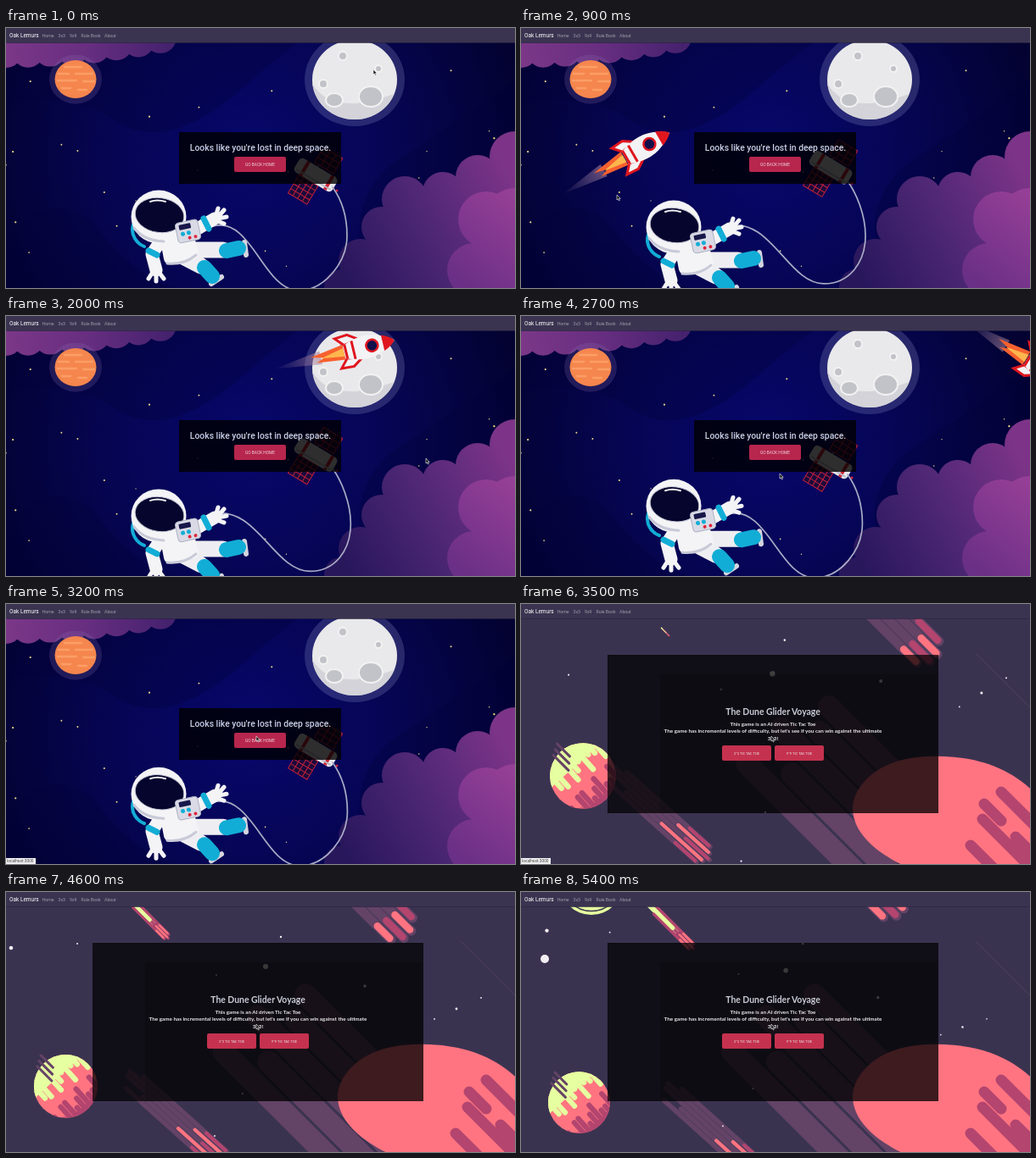
Animation, 600 px wide and 307 px high, one loop 5500 ms. Source, as an HTML page:

```html
<!DOCTYPE html>
<html lang="en">
<head>
<meta charset="utf-8">
<title>Lost in space</title>
<style>
html, body { margin: 0; height: 100%; overflow: hidden; background: #3a3350 }
svg { display: block; width: 100%; height: 100% }
text { font-family: Roboto, sans-serif; fill: #fff }
.mid { text-anchor: middle }
.nav { font-size: 5.2px; fill: #a09cac }
.game text { font-family: Lato, sans-serif; fill: #e8e8ea }
.round { stroke-linecap: round; stroke-linejoin: round; fill: none }
.wing { fill: #1a0a3c; stroke: #c42038 }
</style>
</head>
<body>
<svg viewBox="0 0 600 307" preserveAspectRatio="none">
<defs>
  <radialGradient id="sky" gradientUnits="userSpaceOnUse" cx="290" cy="150" r="330">
    <stop stop-color="#07076c"/><stop offset=".5" stop-color="#060553"/><stop offset="1" stop-color="#030230"/>
  </radialGradient>
  <linearGradient id="cloudOut" gradientUnits="userSpaceOnUse" x1="400" y1="290" x2="600" y2="180">
    <stop stop-color="#29175c"/><stop offset=".5" stop-color="#4e2775"/><stop offset="1" stop-color="#7d3488"/>
  </linearGradient>
  <linearGradient id="cloudIn" gradientUnits="userSpaceOnUse" x1="520" y1="290" x2="600" y2="190">
    <stop stop-color="#6a2f86"/><stop offset="1" stop-color="#984097"/>
  </linearGradient>
  <linearGradient id="cloudTop" gradientUnits="userSpaceOnUse" x1="0" y1="30" x2="190" y2="20">
    <stop stop-color="#7b3788"/><stop offset=".5" stop-color="#672e80"/><stop offset="1" stop-color="#46226e"/>
  </linearGradient>
  <linearGradient id="trail">
    <stop stop-color="#8f7fa8" stop-opacity="0"/><stop offset="1" stop-color="#a98098" stop-opacity=".6"/>
  </linearGradient>
  <clipPath id="disc"><circle r="37"/></clipPath>
  <clipPath id="moonClip"><ellipse cx="411" cy="61" rx="50" ry="47"/></clipPath>
</defs>

<g id="lost">
  <rect width="600" height="307" fill="url(#sky)"/>
  <g fill="#02023a" opacity=".3">
    <path d="M0 90Q70 70 130 110T280 70T360 17H0Z"/>
    <path d="M0 250Q60 180 110 240T200 307H0Z"/>
    <path d="M430 307Q390 200 470 150T600 60V307Z"/>
  </g>
  <g id="sparks" fill="#f5dc8a"></g>
  <g id="cloudLeft" fill="url(#cloudTop)"></g>
  <ellipse cx="82" cy="60.500" rx="31" ry="29" fill="#8a70b0" opacity=".22"/>
  <ellipse cx="82" cy="60.500" rx="24.500" ry="22.500" fill="#f5864d"/>
  <path class="round" stroke="#ffb077" stroke-width="2.500" opacity=".6" d="M69 46h20M62 54h12m8 0h20M61 62h22m8 1h13M66 71h10m9 2h10"/>
  <ellipse cx="411" cy="61" rx="59" ry="55" fill="#8a90c8" opacity=".25"/>
  <g clip-path="url(#moonClip)">
    <path d="M350 0H470V120H350Z" fill="#e9e9eb"/>
    <path d="M359 61Q380 108 462 76V120H359Z" fill="#d3d3d9"/>
    <g fill="#c2c2c9" stroke="#f2f2f2" stroke-width="2">
      <ellipse cx="430" cy="81" rx="14" ry="12"/><ellipse cx="387" cy="85" rx="10" ry="8"/>
      <circle cx="374" cy="66" r="5"/><circle cx="439" cy="48" r="4"/><circle cx="397" cy="33" r="5"/>
    </g>
  </g>
  <g id="cloudRight"></g>

  <g id="rocket">
    <path d="M-106 0L-50 -8V8Z" fill="url(#trail)"/>
    <path d="M-62 -3L-22 -9V9L-56 5L-46 1Z" fill="#f7602f"/>
    <path d="M-50 1L-22 -5V5Z" fill="#ffb64d"/>
    <path d="M-2 -11L-14 -19L-29 -18L-20 -8ZM-2 11L-14 19L-29 18L-20 8Z" fill="#f3f3f5" stroke="#e0161f" stroke-width="3"/>
    <path d="M-21 -8Q8 -20 30 -6Q38 -2 39 0Q38 2 30 6Q8 20 -21 8Z" fill="#f3f3f5"/>
    <path d="M25 -9.500Q36 -5 39 0Q36 5 25 9.500Z" fill="#e0161f"/>
    <path d="M-21 -8L-18 -9V9L-21 8ZM-12 -11h3v22h-3Z" fill="#e0161f"/>
    <circle cx="12" r="7" fill="#10104a" stroke="#e0161f" stroke-width="2.500"/>
  </g>

  <g id="satellite" transform="translate(366 174)">
    <g transform="rotate(31)">
      <path d="M-4 -9V-34M-4 9V29" stroke="#c9a0b0"/>
      <path class="wing" d="M-10 -33h26v21h-26zM-1 -33v21m8 -21v21M-10 -26h26m-26 7h26"/>
      <path class="wing" d="M-18 10h26v25h-26zM-11.500 10v25m6.500 -25v25m6.500 -25v25M-18 16h26m-26 6.500h26m-26 6.500h26"/>
      <rect x="-27" y="-9.500" width="52" height="19" rx="5" fill="#e9e9ed"/>
      <path d="M-18 -9.500h4v19h-4zM15 -9.500h4v19h-4z" fill="#cf2233"/>
      <path d="M-24 6H23" stroke="#babac6" stroke-width="2"/>
    </g>
    <circle cx="24" cy="18" r="1.500" fill="#e0243c"/>
  </g>

  <path id="rope" class="round" stroke="#a9abc6" stroke-width="1.700"/>
  <g id="astronaut" class="round">
    <path d="M205 262L256 262M205 268L230 281" stroke="#eeeef2" stroke-width="19"/>
    <path d="M281 253L283 268M242 302L254 294" stroke="#d4d5de" stroke-width="6"/>
    <path d="M260 263L274 260M234 283L243 293" stroke="#12add6" stroke-width="18"/>
    <path d="M183 250L172 267L177 286M214 244L246 225" stroke="#f4f4f6" stroke-width="15"/>
    <path d="M247 223L250 213M250 223L257 215M250 225L260 223M249 228L257 231M173 288L168 296M177 290L177 299M180 288L186 296" stroke="#f4f4f6" stroke-width="5"/>
    <path d="M168 263L178 268M233 225L239 237" stroke="#12add6" stroke-width="7"/>
    <path d="M188 246L214 244L220 266L193 272Z" fill="#f4f4f6" stroke="#f4f4f6" stroke-width="14"/>
    <path d="M190 278Q210 280 224 268" stroke="#c9cad8" stroke-width="3"/>
    <path d="M150 232C146 245 155 255 163 258" stroke="#12add6" stroke-width="4"/>
    <ellipse cx="180" cy="223" rx="32.500" ry="31.500" fill="#f4f4f6"/>
    <path d="M151 236Q162 251 186 252" stroke="#c9cad8" stroke-width="3"/>
    <ellipse cx="181" cy="221" rx="29" ry="20.500" transform="rotate(8 181 221)" fill="#05052e" stroke="#c9cad8"/>
    <path d="M170 205Q178 202 188 205" stroke="#f4f4f6" stroke-width="2"/>
    <g transform="rotate(-12 214 240)">
      <rect x="201" y="228" width="27" height="24" rx="4" fill="#d9dae5" stroke="#aeb0c4"/>
      <rect x="205" y="231" width="14" height="6" rx="1" fill="#17174a"/>
      <path d="M208 242h0M215 242h0" stroke="#12add6" stroke-width="5"/>
      <path d="M215 248h0M222 248h0" stroke="#e0243c" stroke-width="4"/>
    </g>
  </g>

  <rect x="204" y="123" width="191" height="61" fill="#000" opacity=".8"/>
  <text class="mid" x="300" y="145" font-size="10.350" font-weight="500" style="fill:#c9cfe6">Looks like you're lost in deep space.</text>
  <rect x="269" y="152" width="61" height="18" rx="2" fill="#b7264d"/>
  <text class="mid" x="299.500" y="162.700" font-size="4.800" style="fill:#efd5de">GO BACK HOME</text>
</g>

<g id="home" class="game">
  <rect width="600" height="307" fill="#3a3350"/>
  <path d="M536 58L600 122" stroke="#5a4762" stroke-width=".7"/>
  <g id="giantTrail" class="round"></g>
  <g id="lowMeteor" class="round"></g>
  <g id="highMeteor" class="round"></g>
  <g id="nearMeteor" class="round"></g>
  <g id="stars" fill="#f3eef2"></g>
  <circle id="nearStar" r="5" fill="#f3eef2"/>
  <g id="newPlanet"><circle r="37" fill="#e6ffa0"/><path d="M-25 22A35 35 0 0 0 25 22" fill="none" stroke="#3a3350" stroke-width="1.500"/></g>
  <g id="planet" class="round"></g>
  <path d="M391 238C396 205 432 181 480 180C535 178 580 193 612 230V320H478C430 303 389 275 391 238Z" fill="#ff7480"/>
  <path class="round" stroke="#b3456f" stroke-width="13" d="M566 222L615 271M546 236L566 256M544 254L610 320M530 285L570 325M583 275L610 302"/>
  <rect x="102" y="60" width="390" height="187" fill="#000" opacity=".73"/>
  <rect x="164" y="83" width="328" height="164" fill="#000" opacity=".12"/>
  <text class="mid" x="297" y="131" font-size="10.400" font-weight="700" style="fill:#c9ccd6">The Dune Glider Voyage</text>
  <g class="mid" font-size="6.300" font-weight="700">
    <text x="297" y="143.500">This game is an AI driven Tic Tac Toe</text>
    <text x="297" y="152">The game has incremental levels of difficulty, but let's see if you can win against the ultimate</text>
    <text x="297" y="160.500">3x3!</text>
  </g>
  <path d="M239 167h54q2 0 2 2v14q0 2 -2 2h-54q-2 0 -2 -2v-14q0 -2 2 -2zm62 0h54q2 0 2 2v14q0 2 -2 2h-54q-2 0 -2 -2v-14q0 -2 2 -2z" fill="#c5324f"/>
  <g class="mid" font-size="4"><text x="266" y="177.500">3*3 TIC TAC TOE</text><text x="328" y="177.500">9*9 TIC TAC TOE</text></g>
</g>

<rect width="600" height="17.500" fill="#3a3450"/>
<path d="M0 17.500H600" stroke="#221d38" stroke-width=".8" opacity=".6"/>
<text x="4" y="11" font-size="6.500">Oak Lemurs</text>
<g class="nav">
  <text x="42.500" y="10.500" class="nav">Home</text><text x="61.500" y="10.500" class="nav">3x3</text>
  <text x="75" y="10.500" class="nav">9x9</text><text x="88.500" y="10.500" class="nav">Rule Book</text>
  <text x="116" y="10.500" class="nav">About</text>
</g>
<g id="status">
  <path d="M0 300H35V307H0Z" fill="#f0f0f2"/>
  <text x="1" y="305.300" font-size="4.800" style="fill:#444">localhost:3000</text>
</g>
<path id="cursor" d="M0 0V6L1.400 4.800L2.400 7L3.400 6.500L2.400 4.400H4.200Z" fill="#111" stroke="#fff" stroke-width=".6"/>
</svg>

<script>
const $ = id => document.getElementById(id);
const add = (id, markup) => $(id).insertAdjacentHTML('beforeend', markup);
const move = (id, x, y, more = '') => $(id).setAttribute('transform', `translate(${x} ${y}) ${more}`);
const show = (id, on) => $(id).style.display = on ? '' : 'none';
const repeat = (n, make) => Array.from({ length: n }, (_, i) => make(i)).join('');
const circle = (x, y, r) => `<circle cx="${x}" cy="${y}" r="${r}"/>`;
const bar = (x1, x2, y, width, color) => `<path d="M${x1} ${y}H${x2}" stroke-width="${width}" stroke="${color}"/>`;
const pink = '#ff7480', plum = '#b3456f', haze = '#634366', lime = '#e6ffa0';

let seed = 11;
const random = () => (seed = seed * 16807 % 2147483647) / 2147483647;

// Parallel streaks ending at x = 0: a long tail with a brighter head.
const streaks = (rows, length, gap, tail, heads) => repeat(rows, i => {
  const y = (i - (rows - 1) / 2) * gap, tip = -Math.abs(y) * .8;
  return bar(-length * (.75 + .25 * random()), tip, y, gap * .95, tail) +
    bar(-length * (.2 + .25 * random()), tip - 2, y, gap * .7, heads[i % heads.length]);
});

add('sparks', repeat(32, () => circle(600 * random(), 50 + 250 * random(), .6 + .6 * random())));
add('cloudLeft', repeat(8, i => circle(26 * i, 28 - .35 * i * i, 19)));
add('cloudRight', '<g fill="url(#cloudOut)"><path d="M600 150L470 205L395 307H600Z"/>' +
  [[600, 152, 30], [556, 176, 26], [515, 194, 24], [470, 202, 27], [443, 235, 24], [418, 275, 26], [395, 305, 20]]
    .map(c => circle(...c)).join('') +
  '</g><g fill="url(#cloudIn)"><path d="M600 200L560 240L545 307H600Z"/>' +
  circle(600, 225, 36) + circle(566, 226, 33) + circle(552, 286, 32) + '</g>');

add('giantTrail', `<g transform="translate(320 115) rotate(45)">${
  repeat(5, i => bar(35 + 25 * Math.sin(i * 2.6), 240, i * 29 - 26, 26, haze))}</g>`);
add('lowMeteor', `<g transform="rotate(42)">${streaks(5, 160, 6, haze, [plum, pink])}</g>`);
add('highMeteor', `<g transform="rotate(45)">${bar(-80, -30, -1, 9, lime)}${streaks(3, 70, 4, plum, [pink])}${bar(-75, -34, 0, 5, lime)}</g>`);
add('nearMeteor', `<g transform="rotate(45)">${streaks(4, 120, 12, haze, [plum, pink])}</g>`);

add('planet', `<circle r="37" fill="${pink}"/><g clip-path="url(#disc)"><g transform="rotate(48)">
  <path d="M-60 -40H-14V40H-60Z" fill="${lime}"/><path d="M31 -40H60V40H31Z" fill="${plum}"/>
  ${repeat(11, n => {
    const i = n - 5, y = i * 6.8;
    return bar(-60, -8 + 10 * Math.sin(i * 2.3), y, 6.2, lime) + bar(19 + 9 * Math.sin(i * 1.9), 60, y, 6.2, plum);
  })}</g></g>
  <g transform="rotate(45)">${repeat(3, i => bar(-46 + 3 * i, -26 + 5 * i, 6 * i - 5, 3, haze))}</g>`);

const starPlaces = [[306, 88, 3], [423, 111, 1.8], [531, 138, 1.4], [248, 98, 1], [560, 125, .9], [505, 150, .9],
  [6, 66, 2.3], [84, 61, 1], [324, 53, 1.2], [279, 238, 1.1], [246, 288, 1]];
add('stars', starPlaces.map(s => circle(...s)).join(''));

function drawLost(t) {
  const s = (1 - Math.cos(2 * Math.PI * t / 2.95)) / 2;
  move('astronaut', 0, 18 * s);
  move('satellite', 366, 174 - 13 * s);

  const low = [345 + 18 * s, 310 - 12 * s], right = 402 + 6 * s, end = 188 - 11 * s;
  $('rope').setAttribute('d', `M244 234C${290 + 6 * s} 222 ${low[0] - 42} ${low[1]} ${low}
    C${low[0] + 30} ${low[1]} ${right} 277 ${right} 245C${right} 220 395 ${end + 14} 385 ${end}`);

  const u = t - .9;
  move('rocket', 141 + 238 * u + 14 * u * u, 143 - 175 * u + 72 * u * u, `rotate(${3 * Math.exp(1.7 * u) - 33})`);
}

function drawHome(t) {
  const u = t - 3.5, v = t - 4.6;
  // The star field turns and shrinks about the middle of the page.
  $('stars').setAttribute('transform',
    `translate(300 162) rotate(${6.6 * v}) scale(${Math.exp(-.065 * v)}) translate(-300 -162)`);
  move('nearStar', 28 + 45 * (t - 5.4), 79 - 22 * (t - 5.4));
  move('planet', 73 - 2.4 * u, 203 + 24 * u, `scale(${1.05 - .035 * u})`);
  move('newPlanet', 83, -10 + 24 * (t - 5.4));
  move('giantTrail', -9 * u, 0);
  move('lowMeteor', 222 + 34 * u, 302 + 18 * u);
  move('nearMeteor', 490 - 11 * u * u, 67 - 11 * u * u);
  move('highMeteor', 175 + 14.7 * u, 38 + 15 * u, `scale(${Math.min(1, Math.max(.02, .17 + .66 * u))})`);
}

const cursorStops = [[0, 433, 49], [.9, 113, 197], [2, 495, 168], [2.7, 305, 186], [3.1, 295, 156]];
function drawCursor(t) {
  const next = cursorStops.findIndex(stop => stop[0] > t);
  if (next < 0) return move('cursor', 295, 156);
  const [t0, x0, y0] = cursorStops[next - 1], [t1, x1, y1] = cursorStops[next];
  const k = (t - t0) / (t1 - t0);
  move('cursor', x0 + (x1 - x0) * k, y0 + (y1 - y0) * k);
}

function draw(now) {
  const t = Math.floor(now % 5500 / 100) / 10;
  const atHome = t >= 3.3;
  show('lost', !atHome);
  show('home', atHome);
  show('status', t >= 3.1 && t < 4);
  (atHome ? drawHome : drawLost)(t);
  drawCursor(t);
  requestAnimationFrame(draw);
}
requestAnimationFrame(draw);
</script>
</body>
</html>
```
